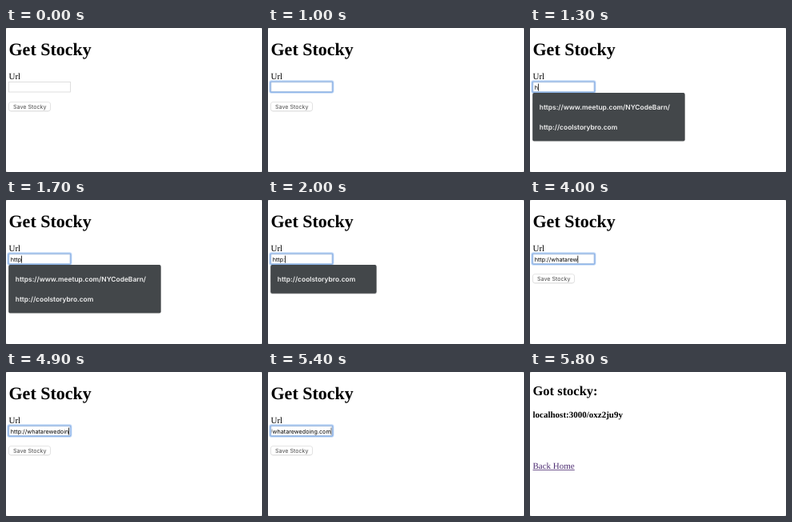
An HTML page that plays this animation: 320x180 px, repeating every 6.8 s.

```html
<!DOCTYPE html>
<html lang="en">
<head>
<meta charset="utf-8">
<title>Get Stocky</title>
<style>
  html, body { margin: 0; width: 100%; height: 100%; overflow: hidden; background: #cfcfcf; }
  svg { display: block; width: 320px; height: 180px; }
  text { font-family: "Liberation Serif", "Times New Roman", serif; font-size: 11px; fill: #000; text-rendering: geometricPrecision; }
  .h1 { font-size: 22px; font-weight: 700; }
  .h2 { font-size: 16.5px; font-weight: 700; }
  .h4 { font-weight: 700; }
  .ui { font-family: Inter, Roboto, sans-serif; font-size: 7.2px; }
  .label { font-size: 7.1px; fill: #4a4a4a; }
  .hint { font-family: Inter, Roboto, sans-serif; font-size: 8.42px; font-weight: 600; fill: #f0f0f0; }
  .link { fill: #4f2f74; }

  /* Page swap */
  #form { animation: form 6.8s step-end infinite; }
  #result { animation: result 6.8s step-end infinite; }
  #ring { animation: ring 6.8s step-end infinite; }
  @keyframes form { 0% { visibility: visible; } 85.294% { visibility: hidden; } }
  @keyframes result { 0% { visibility: hidden; } 85.294% { visibility: visible; } }
  @keyframes ring { 0% { visibility: hidden; } 7.353% { visibility: visible; } 85.294% { visibility: hidden; } }
</style>
</head>
<body>
<svg viewBox="0 0 320 180" xmlns="http://www.w3.org/2000/svg">
  <defs>
    <clipPath id="field"><rect x="4.5" y="68" width="75" height="12"/></clipPath>
  </defs>
  <rect width="320" height="180" rx="2.5" fill="#fff"/>

  <g id="form">
    <text class="h1" x="3.5" y="33.8">Get Stocky</text>
    <text x="3.5" y="63.9">Url</text>
    <rect x="3.5" y="67.5" width="77" height="12.5" fill="#fff" stroke="#d6d6d6" stroke-width=".8"/>
    <rect x="3.5" y="93" width="52" height="11.2" rx="2.6" fill="#cdcdcd"/>
    <rect x="3.5" y="92.6" width="52" height="11.2" rx="2.6" fill="#fff" stroke="#dadada" stroke-width=".7"/>
    <text class="ui label" x="9" y="101">Save Stocky</text>
  </g>

  <g id="ring" fill="none">
    <rect x="2.1" y="66.1" width="79.6" height="15" rx="2" stroke="#c6dbf6" stroke-width="1.5"/>
    <rect x="3" y="67" width="77.9" height="13.2" rx="1.2" stroke="#7eabe8" stroke-width="1.2"/>
    <rect x="3.9" y="67.9" width="76.1" height="11.5" stroke="#a9c2e4" stroke-width=".7"/>
  </g>

  <g clip-path="url(#field)">
    <text id="typed" class="ui" x="5.7" y="76.7"></text>
    <rect id="caret" y="69.6" width=".8" height="9" fill="#000"/>
  </g>

  <g id="menu">
    <rect id="shade" x="3" y="82" rx="2.5" fill="#000" opacity=".18"/>
    <rect id="panel" x="3.2" y="81" rx="2" fill="#43474a"/>
    <text id="first" class="hint" x="11.8" y="102.4"></text>
    <text id="second" class="hint" x="11.8" y="127"></text>
  </g>

  <g id="result">
    <text class="h2" x="3.5" y="29">Got stocky:</text>
    <text class="h4" x="3.5" y="57.1">localhost:3000/oxz2ju9y</text>
    <text class="link" x="3.5" y="121">Back Home</text>
    <rect x="3.5" y="122" width="52.3" height=".8" fill="#4f2f74"/>
  </g>
</svg>
<script>
  const LOOP = 6800, LEFT = 5.7, RIGHT = 78.7;
  const url = "http://whatarewedoing.com";
  const long = "https://www.meetup.com/NYCodeBarn/";
  const short = "http://coolstorybro.com";

  // [time in ms, characters typed so far]
  const keys = [
    [1300, 1], [1500, 2], [1600, 3], [1700, 4], [2000, 5], [2400, 6], [2600, 7],
    [2900, 8], [3000, 9], [3200, 10], [3300, 11], [3500, 12], [3700, 14],
    [4000, 15], [4200, 16], [4600, 17], [4800, 18], [4900, 20], [5000, 21],
    [5100, 22], [5300, 23], [5400, 25]
  ];

  const $ = id => document.getElementById(id);
  const typed = $("typed"), caret = $("caret"), menu = $("menu");
  const show = (el, on) => el.setAttribute("visibility", on ? "visible" : "hidden");

  function size(el, w, h) {
    el.setAttribute("width", w);
    el.setAttribute("height", h);
  }

  function drawField(t) {
    let count = 0;
    for (const [at, n] of keys) if (t >= at) count = n;
    if (t >= 5800) count = 0;
    typed.textContent = url.slice(0, count);
    const width = count ? typed.getComputedTextLength() : 0;
    const x = Math.min(LEFT, RIGHT - width);
    typed.setAttribute("x", x);
    caret.setAttribute("x", x + width - (count ? 0 : .4));
    show(caret, (t >= 500 && t < 1000) || (t >= 1300 && t < 5800));
  }

  function drawMenu(t) {
    const both = t < 2000;
    const w = both ? 190.4 : 132.4, h = both ? 60.3 : 35.8;
    show(menu, t >= 1300 && t < 2900);
    size($("panel"), w, h);
    size($("shade"), w + .4, h);
    $("first").textContent = both ? long : short;
    $("second").textContent = both ? short : "";
  }

  const start = performance.now();
  function frame() {
    const t = (performance.now() - start) % LOOP;
    drawField(t);
    drawMenu(t);
    requestAnimationFrame(frame);
  }
  frame();
</script>
</body>
</html>
```
